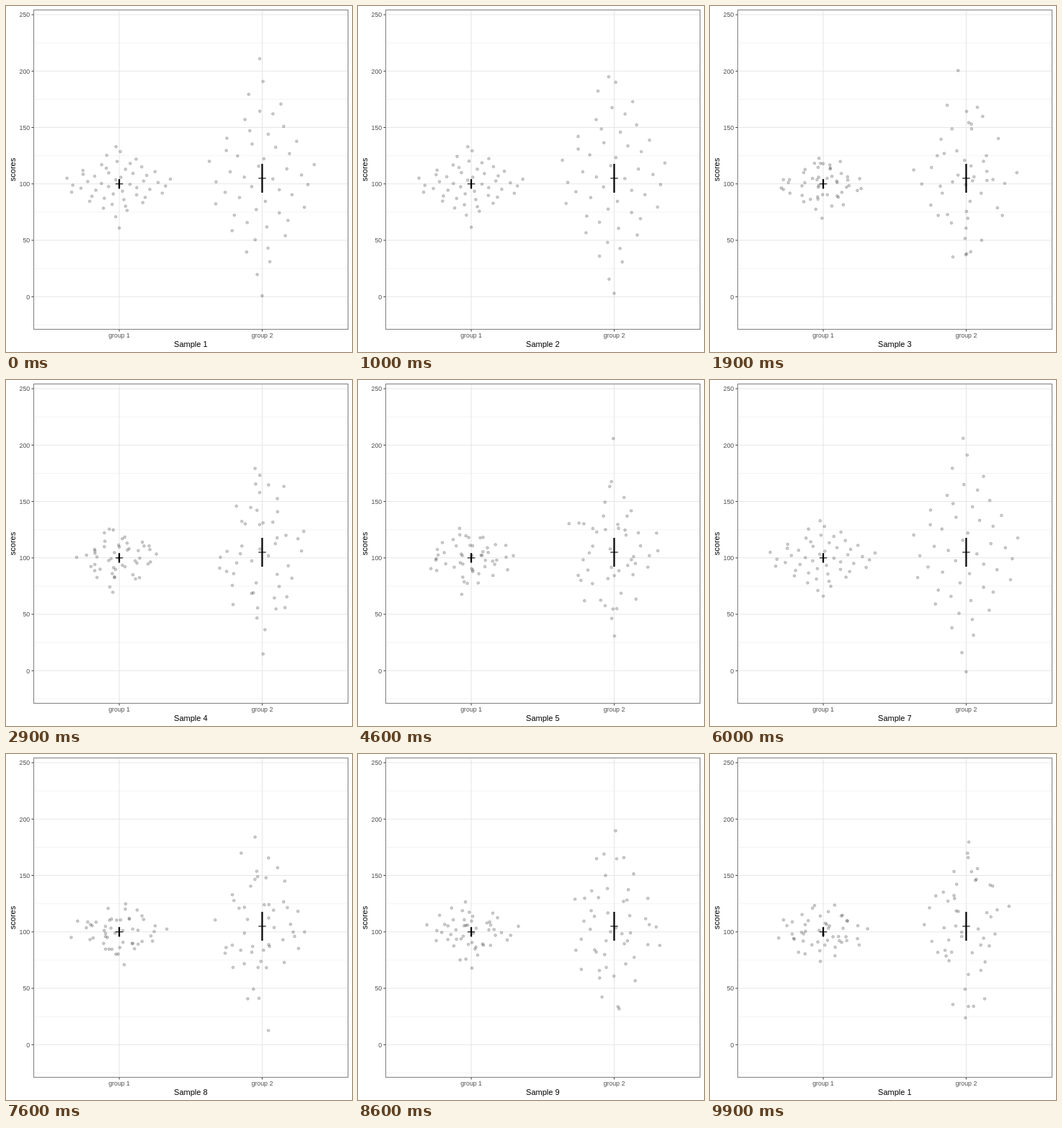
Recreate the animation shown at these times as an HTML page. Size 480x480 px, loop 10000 ms.

```html
<!DOCTYPE html>
<html lang="en">
<head>
<meta charset="utf-8">
<title>Sampling variation in two groups</title>
<style>
  html, body { margin: 0; width: 100%; height: 100%; overflow: hidden; background: #fff; }
  svg { display: block; width: 480px; height: 480px; font-family: "Liberation Sans", Arial, sans-serif; }
  .major, .minor { stroke: #e6e6e6; stroke-width: 1.07; }
  .minor { stroke: #ebebeb; stroke-width: .6; }
  .tick { stroke: #333; stroke-width: 1; }
  .border { fill: none; stroke: #7f7f7f; stroke-width: 1; }
  .label { font-size: 8.8px; fill: #4d4d4d; }
  .title { font-size: 11px; fill: #000; text-anchor: middle; }
  .mid { text-anchor: middle; }
  .end { text-anchor: end; }
  .dot { fill: #000; stroke: #000; stroke-width: .7; fill-opacity: .2; stroke-opacity: .22; }
  .range { stroke: #000; stroke-width: 2.2; }
  .mean { stroke: #000; stroke-width: 1.1; }
</style>
</head>
<body>
<svg id="plot" viewBox="0 0 480 480"></svg>
<script>
const N = 50, SAMPLES = 10, STEP = 100, UNIT = 198.3;
const BOX = { left: 38.5, right: 474.5, top: 5.5, bottom: 448.5 };
const plot = document.getElementById('plot');
const yPos = v => 403.3 - 1.565 * v;

function add(tag, attrs, text) {
  const el = document.createElementNS('http://www.w3.org/2000/svg', tag);
  for (const k in attrs) el.setAttribute(k, attrs[k]);
  if (text) el.textContent = text;
  return plot.appendChild(el);
}
const line = (cls, x1, y1, x2, y2) => add('line', { class: cls, x1, y1, x2, y2 });

// Highest score of the wide group in each sample
const peaks = [211, 195, 223, 190, 242, 200, 206, 190, 193, 203];
const groups = [
  { x: 157.1, mean: 100, sd: 15, high: () => 133 },
  { x: 355.4, mean: 105, sd: 45, high: s => peaks[s] }
];

let seed = 7;
function random() {
  seed = (seed + 0x6D2B79F5) | 0;
  let t = Math.imul(seed ^ (seed >>> 15), 1 | seed);
  t = (t + Math.imul(t ^ (t >>> 7), 61 | t)) ^ t;
  return ((t ^ (t >>> 14)) >>> 0) / 4294967296;
}
const range = n => Array.from({ length: n }, (_, i) => i);
const sum = a => a.reduce((s, v) => s + v, 0);
const mix = (a, b, p) => a + (b - a) * p;
const probit = u => (u ** .135 - (1 - u) ** .135) / .1975;

// Sorted normal scores with the exact mean and deviation of the group
function draw(g, high) {
  const top = (high - g.mean) / g.sd;
  const z = range(N - 1).map(i => probit((i + .2 + .6 * random()) / N));
  const m = sum(z) / z.length, goal = -top / z.length;
  const ss = sum(z.map(v => (v - m) ** 2));
  const scale = Math.sqrt((N - 1 - top * top - z.length * goal * goal) / ss);
  return [...z.map(v => goal + (v - m) * scale), top]
    .map(v => g.mean + g.sd * v)
    .sort((a, b) => a - b);
}

function vanDerCorput(k) {
  let v = 0;
  for (let w = .5; k; k >>= 1, w /= 2) v += (k & 1) * w;
  return v;
}

// Quasirandom spread: offset by rank, scaled by the local density
function swarm(g, ys) {
  const bw = .45 * g.sd * N ** -.2;
  const density = v => sum(ys.map(y => Math.exp(-.5 * ((v - y) / bw) ** 2)));
  const peak = Math.max(...range(300).map(i => density(mix(ys[0], ys[N - 1], i / 299))));
  return ys.map((y, i) => ({
    x: g.x + (vanDerCorput(i + 1) - .5) * .8 * UNIT * density(y) / peak,
    y: yPos(y)
  }));
}

function shuffle(list) {
  for (let i = list.length - 1; i > 0; i--) {
    const j = Math.floor(random() * (i + 1));
    [list[i], list[j]] = [list[j], list[i]];
  }
  return list;
}

const samples = range(SAMPLES).map(s =>
  groups.flatMap(g => shuffle(swarm(g, draw(g, g.high(s))))));

// Panel
for (let v = -25; v <= 225; v += 50) line('minor', BOX.left, yPos(v), BOX.right, yPos(v));
for (let v = 0; v <= 250; v += 50) {
  const y = yPos(v);
  line('major', BOX.left, y, BOX.right, y);
  line('tick', BOX.left - 3, y, BOX.left, y);
  add('text', { class: 'label end', x: 33.2, y: y + 3.3 }, String(v));
}
groups.forEach((g, i) => {
  line('major', g.x, BOX.top, g.x, BOX.bottom);
  line('tick', g.x, BOX.bottom, g.x, BOX.bottom + 3);
  add('text', { class: 'label mid', x: g.x, y: 460.4 }, 'group ' + (i + 1));
});

const dots = samples[0].map(() => add('circle', { class: 'dot', r: 1.95 }));

// Mean with its 95% interval
for (const g of groups) {
  const ci = 2.01 * g.sd / Math.sqrt(N);
  line('range', g.x, yPos(g.mean - ci), g.x, yPos(g.mean + ci));
  line('mean', g.x - 5.2, yPos(g.mean), g.x + 5.2, yPos(g.mean));
}
add('rect', {
  class: 'border', x: BOX.left, y: BOX.top,
  width: BOX.right - BOX.left, height: BOX.bottom - BOX.top
});
add('text', { class: 'title', transform: 'translate(13.2 227) rotate(-90)' }, 'scores');
const title = add('text', { class: 'title', x: 256.3, y: 473 });

// Each sample holds for six steps, then moves linearly to the next
let shown = -1;
function render(ms) {
  const step = Math.floor(ms / STEP) % (SAMPLES * 10);
  if (step === shown) return;
  shown = step;
  const s = Math.floor(step / 10), next = (s + 1) % SAMPLES;
  const p = Math.max(0, step % 10 - 5) / 5;
  dots.forEach((dot, i) => {
    const a = samples[s][i], b = samples[next][i];
    dot.setAttribute('cx', mix(a.x, b.x, p).toFixed(2));
    dot.setAttribute('cy', mix(a.y, b.y, p).toFixed(2));
  });
  title.textContent = 'Sample ' + ((p > .5 ? next : s) + 1);
}
const start = performance.now();
function loop() {
  render(performance.now() - start);
  requestAnimationFrame(loop);
}
loop();
</script>
</body>
</html>
```
